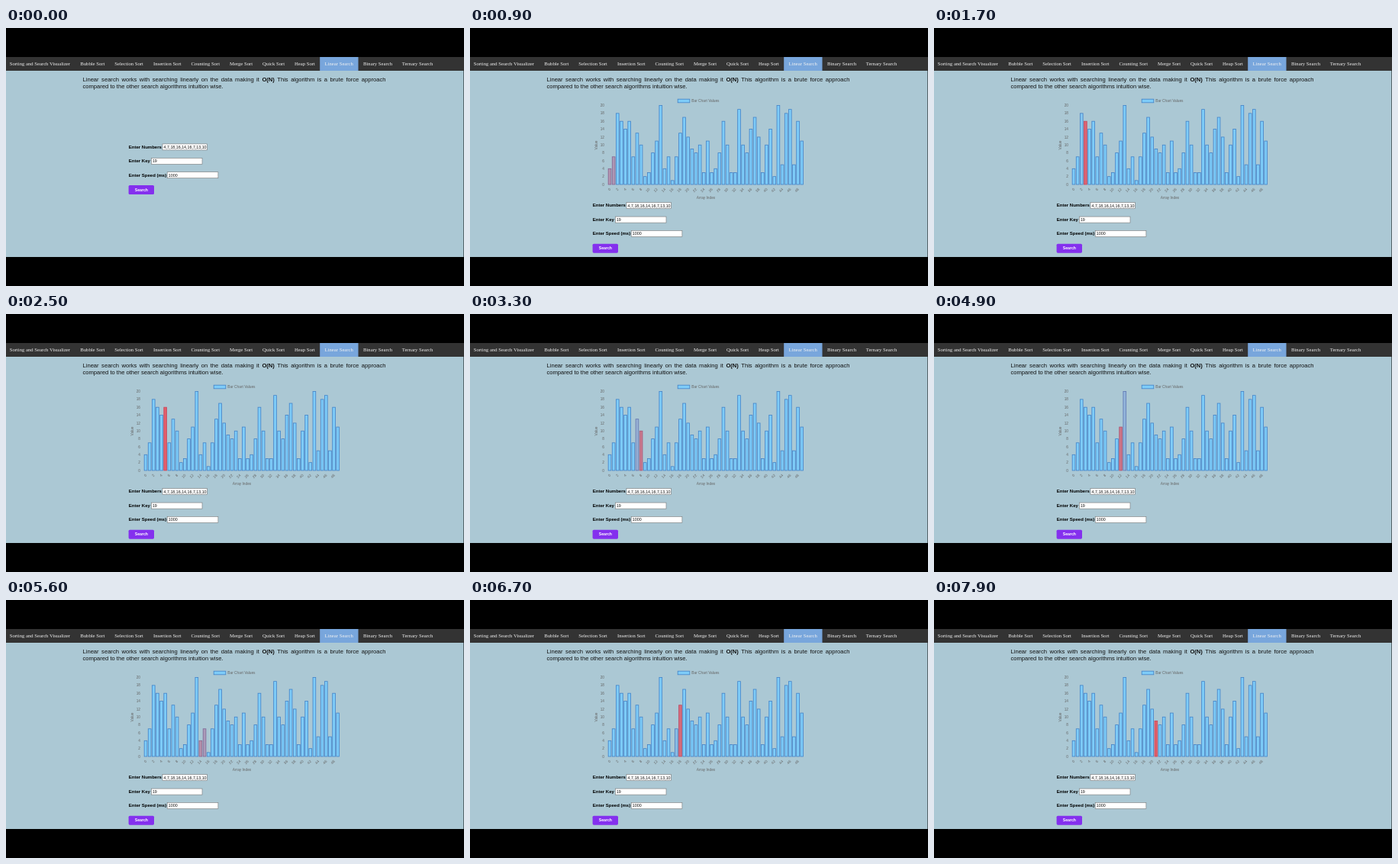
These frames come from a looping animation (600 px wide and 338 px high, 8000 ms). An HTML page:

```html
<!DOCTYPE html>
<html lang="en">
<head>
<meta charset="utf-8">
<title>Linear Search</title>
<style>
  html, body { margin: 0; width: 100%; height: 100%; overflow: hidden; background: #000; }
  svg { position: absolute; left: 0; top: 0; display: block; }
  svg, p { font-family: "Liberation Sans", Arial, sans-serif; }
  p { position: absolute; left: 100.5px; top: 64.2px; width: 397px; margin: 0;
      font-size: 7.6px; line-height: 8.7px; text-align: justify; color: #111; }
  .nav { font: 6.68px "Liberation Serif", "Times New Roman", serif; fill: #f2f2f2; }
  .label { font-size: 6px; font-weight: bold; fill: #000; }
  .value { font-size: 5.3px; fill: #111; }
  .button { font-size: 5.2px; font-weight: bold; fill: #fff; text-anchor: middle; }
  .axis { font-size: 4.8px; fill: #666; }
  .end { text-anchor: end; }
  .middle { text-anchor: middle; }
</style>
</head>
<body>
<svg id="stage" width="600" height="338" viewBox="0 0 600 338">
  <rect width="600" height="338" fill="#000"/>
  <rect y="56" width="599.5" height="244" fill="#abc8d4"/>
  <rect y="38" width="600" height="18" fill="#333"/>
  <rect x="411.2" y="38" width="50.3" height="18" fill="#78a6dc"/>
  <g id="nav"></g>
  <g id="chart"></g>
  <g id="form"></g>
</svg>
<p>Linear search works with searching linearly on the data making it <b>O(N)</b> This algorithm is a brute force approach compared to the other search algorithms intuition wise.</p>
<script>
const LOOP = 8000;
const CHART_START = 514;
const STEP = 336;
const FORM_SHIFT = 76.7;
const BASE_Y = 205;
const UNIT = 5.175;
const BAR_GAP = 5.137;
const BAR_WIDTH = 3.7;
const BLUE = { fill: [126, 204, 248], stroke: [66, 130, 200] };
const RED = { fill: [226, 94, 106], stroke: [200, 70, 90] };
const values = [
  4, 7, 18, 16, 14, 16, 7, 13, 10, 2, 3, 8, 11, 20, 4, 7, 1, 7, 13, 17, 12, 9, 8, 10, 3,
  11, 3, 4, 8, 16, 10, 3, 3, 19, 10, 8, 14, 17, 12, 3, 10, 14, 2, 20, 5, 18, 19, 5, 16, 11
];

const byId = id => document.getElementById(id);
const nav = byId("nav"), chart = byId("chart"), form = byId("form");

function add(parent, tag, attrs, content) {
  const node = document.createElementNS("http://www.w3.org/2000/svg", tag);
  for (const name in attrs) node.setAttribute(name, attrs[name]);
  if (content !== undefined) node.textContent = content;
  parent.appendChild(node);
  return node;
}

const addText = (parent, x, y, style, content, more) =>
  add(parent, "text", { x, y, class: style, ...more }, content);

const barX = i => 183 + i * BAR_GAP;

function buildNav() {
  const items = [
    ["Sorting and Search Visualizer", 4.7], ["Bubble Sort", 97.3], ["Selection Sort", 142.3],
    ["Insertion Sort", 193], ["Counting Sort", 242.4], ["Merge Sort", 293],
    ["Quick Sort", 336], ["Heap Sort", 378], ["Linear Search", 417.6],
    ["Binary Search", 468], ["Ternary Search", 518.8]
  ];
  for (const [name, x] of items) addText(nav, x, 49, "nav", name);
}

function buildForm() {
  const rows = [
    ["Enter Numbers", 155.9, 205, 58.3, "4,7,18,16,14,16,7,13,10"],
    ["Enter Key", 174.4, 190.3, 66.7, "19"],
    ["Enter Speed (ms)", 192.7, 211.2, 66.7, "1000"]
  ];
  for (const [label, y, x, width, value] of rows) {
    addText(form, 160.8, y + 1.9, "label", label);
    add(form, "rect", { x, y: y - 4, width, height: 8, fill: "#fff", stroke: "#777", "stroke-width": 0.6 });
    addText(form, x + 1.6, y + 2, "value", value);
  }
  add(form, "rect", { x: 160.6, y: 206, width: 33.4, height: 12, rx: 1.6, fill: "#8430ee" });
  addText(form, 177.4, 213.8, "button", "Search");
}

function buildChart() {
  add(chart, "rect", {
    x: 272.2, y: 93.2, width: 15.6, height: 4.6,
    fill: `rgb(${BLUE.fill})`, stroke: `rgb(${BLUE.stroke})`, "stroke-width": 0.8
  });
  addText(chart, 290.3, 97.2, "axis", "Bar Chart Values");
  for (let v = 0; v <= 20; v += 2) addText(chart, 176, BASE_Y - v * UNIT + 1.6, "axis end", v);
  for (let i = 0; i < values.length; i += 2) {
    addText(chart, 0, 0, "axis end", i, { transform: `translate(${barX(i) + 1.6} 211.6) rotate(-45)` });
  }
  addText(chart, 0, 0, "axis middle", "Value", { transform: "translate(167 153.5) rotate(-90)" });
  addText(chart, 309, 224, "axis middle", "Array Index");
  return values.map((v, i) =>
    add(chart, "rect", { x: barX(i) - BAR_WIDTH / 2, width: BAR_WIDTH, "stroke-width": 0.8 }));
}

buildNav();
buildForm();
const bars = buildChart();

const easeOutQuart = p => 1 - (1 - Math.min(1, Math.max(0, p))) ** 4;
const mix = (a, b, p) => `rgb(${a.map((c, i) => Math.round(c + (b[i] - c) * p))})`;

function draw(time) {
  const elapsed = time - CHART_START;
  const shown = elapsed >= 0;
  chart.setAttribute("visibility", shown ? "visible" : "hidden");
  form.setAttribute("transform", `translate(0 ${shown ? FORM_SHIFT : 0})`);
  if (!shown) return;

  const current = Math.floor(elapsed / STEP);
  const fade = easeOutQuart(elapsed / STEP - current);
  const grow = easeOutQuart(elapsed / STEP);
  bars.forEach((bar, i) => {
    const height = values[i] * UNIT * grow;
    const heat = i === current ? (i ? fade : 1) : i === current - 1 ? 1 - fade : 0;
    bar.setAttribute("y", BASE_Y - height);
    bar.setAttribute("height", height);
    bar.setAttribute("fill", mix(BLUE.fill, RED.fill, heat));
    bar.setAttribute("stroke", mix(BLUE.stroke, RED.stroke, heat));
  });
}

const start = performance.now();
function tick() {
  draw((performance.now() - start) % LOOP);
  requestAnimationFrame(tick);
}
tick();
</script>
</body>
</html>
```
